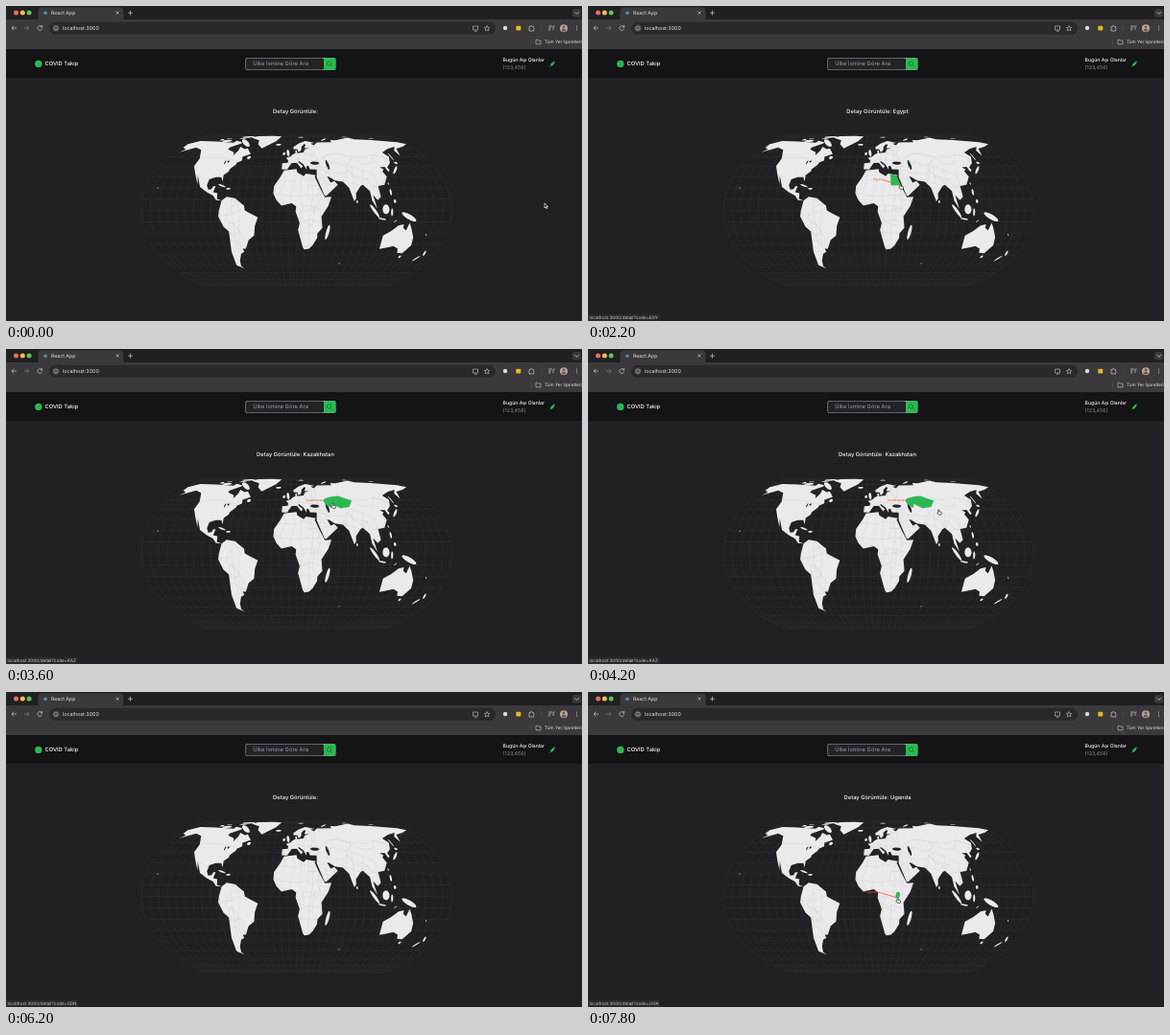
Recreate the animation shown at these times as an HTML page with a canvas. Size 600 px wide and 329 px high, loop 8000 ms.

```html
<!DOCTYPE html>
<html lang="tr">
<head>
<meta charset="utf-8">
<title>React App</title>
<style>
html, body { margin: 0; width: 100%; height: 100%; overflow: hidden; background: #212024; }
canvas { display: block; width: 600px; height: 329px; }
</style>
</head>
<body>
<canvas id="stage"></canvas>
<script>
const W = 600, H = 329, LOOP = 8000, STEP = 200;
const BODY = '#212024', BAR = '#3b393c', LAND = '#eaeaec', GREEN = '#2cb851', RED = '#ff5533';
const canvas = document.getElementById('stage');
const dpr = window.devicePixelRatio || 1;
canvas.width = W * dpr;
canvas.height = H * dpr;
const g = canvas.getContext('2d');

// Equal Earth projection, turned so that 10°E lies in the middle
function project(lon, lat) {
  const A = 1.340264, B = -0.081106, C = 0.000893, D = 0.003796, rad = Math.PI / 180;
  const t = Math.asin(Math.sqrt(3) / 2 * Math.sin(lat * rad)), t2 = t * t, t6 = t2 ** 3;
  const x = 2 * Math.sqrt(3) * (lon - 10) * rad * Math.cos(t) /
    (3 * (A + 3 * B * t2 + t6 * (7 * C + 9 * D * t2)));
  const y = t * (A + B * t2 + t6 * (C + D * t2));
  return [302.6 + 59.7 * x, 213.6 - 59.7 * y];
}

function numbers(s) {
  return s.trim().split(/\s+/).map(Number);
}
function outline(data) {
  const path = new Path2D(), n = numbers(data);
  for (let i = 0; i < n.length; i += 2) path.lineTo(...project(n[i], n[i + 1]));
  path.closePath();
  return path;
}
// Ellipse in degrees: centre, radii, tilt
function blob(data) {
  const [lon, lat, rx, ry, tilt = 0] = numbers(data), path = new Path2D();
  const c = Math.cos(tilt * Math.PI / 180), s = Math.sin(tilt * Math.PI / 180);
  for (let a = 0; a < 6.28; a += 0.5) {
    const u = rx * Math.cos(a), v = ry * Math.sin(a);
    path.lineTo(...project(lon + u * c - v * s, lat + u * s + v * c));
  }
  path.closePath();
  return path;
}

// Key points of the coasts, longitude and latitude
const continents = {
  northAmerica: '-168 66 -156 71 -128 70 -95 68 -94 71.5 -82 69 -81 67 -94 61 -94 58.7 -82 55 -80 51.5 -77 57 -78 62 -69 59 -65 60 -56 53 -66 50 -64 46 -70 43.5 -70 41.7 -76 37 -76 35 -81 31.5 -80 25.5 -83 29.5 -90 29.5 -97 27.5 -97.7 22 -95 18.2 -91 18.7 -90 21 -87 21.5 -88.5 16 -83.3 15 -83 10 -77.4 8.5 -84 9 -88 13 -96 16 -105.5 20.5 -113 31 -109.5 23 -117 32.5 -124 40 -124 48 -134 58 -146 61 -162 55 -158 58.5 -166 61',
  southAmerica: '-77.4 8.5 -72 12 -62 10.7 -51 4.2 -50 0 -44 -2.5 -35 -6 -39 -13.5 -41 -22 -48.5 -26 -54 -34 -58 -34 -57 -37 -62 -39 -67 -46 -69 -52 -66 -55 -75 -51 -73.5 -37 -70.4 -18.3 -76 -14 -81 -5 -80 0',
  greenland: '-73 78.3 -62 82 -35 83.5 -18 81 -25 70.3 -43.5 60 -53 66 -55 72 -68 76',
  africa: '-6 35.8 10 37.3 11 34 19 30.5 22 32.9 34 31.3 32.5 29.9 37.2 21 43.3 11.5 51 12 47 4 39 -5 40.5 -15 35 -20 35 -24 30 -31 25.7 -34 20 -34.8 18 -33 11.8 -17 13.7 -11 9 -1 9.6 3.5 4.5 6.2 -3 5 -7.5 4.3 -13.5 9 -17.3 14.8 -17 21.5 -9.7 30',
  europe: '-9 43 -1.7 43.4 -1.2 46 -4.7 48.5 1.5 50.2 4.5 52.5 8.5 54 8.2 57 10.5 57.5 11 54 20 54.7 23 59 30 60 22 60.5 25 65 22 65.8 17 61 18 60 16 56.5 13 55.5 11 59 6 58.5 5 61.5 13 66.5 25 71 40 67.5 33 66.5 38 64 50 62 50 42 36 36.7 27.3 37 26 40 23 40.3 23 36.5 19.5 41.5 13 45.5 12.5 44 18.5 40.2 16 38 10.5 43.5 3.5 43.3 -.3 39 -2 36.8 -9 37',
  asia: '38 64 44 68.4 69 69 69 72.5 78 72 104 77.6 113 74 140 72.5 180 69 190 66 178 62.5 163 59.5 157 51 156 57 164 62 150 59.4 135.5 54.7 140 50 135 43.3 128 39 129 36 126.5 34.5 125 39.5 118 39 122 37 119.3 35 122 30 116 22.5 108 21.5 109 12 105 9 100 13.3 104 1.4 98.3 8.5 97 17 90 22.5 87 21.5 80.2 15 79.8 10.5 77.5 8 72.8 20 66.5 25.3 57 26.5 50 30 48 30 51.5 24.5 56.2 26 59.8 22.5 45 12.8 43 13 35 29.5 36 36.7',
  australia: '114 -22 115 -34.3 124 -33 131 -31.5 138 -34 140 -38 147 -38.5 153 -31 151 -23.5 145.5 -15 142.5 -10.8 140 -17.5 136 -15 136 -12 130 -13 122.2 -18'
};
const islands = [
  // Arctic and Atlantic
  '-75 68 12 2.6 -28', '-110 71 8 2', '-121 73 3.5 1.5', '-80 80 11 2.3 6', '-86 75.3 7 .7', '-111 75.6 5 .6',
  '58 73.5 6 1 20', '18 78.7 5 1', '99 79.3 4 .8', '144 75 5 .5', '-19 65 4.5 1.3', '-8 53.3 1.9 1.7',
  '-2.3 54.3 2 4.2 18', '-56.3 49 2.5 1.8', '-79.5 21.7 5 .7 -15', '-71.3 19 2.7 .8',
  // Indian Ocean and Pacific
  '47 -19 1.9 6.8 -15', '80.8 7.6 .9 1.4', '101 -.4 8 1.5 -45', '110 -7.3 4.8 .7 -7', '114 1 4 4.2', '121 -1.5 1.2 3.4',
  '141 -5.5 9.5 2.2 -22', '125.5 -9.2 2 .4 25', '121.5 16 1.2 2.8', '124.8 8 1.5 1.6', '121 23.7 .6 1.2',
  '136.5 36.3 6 1.1 38', '143 43.4 2 1.2', '142.8 50 .8 4', '146.7 -42 1.6 1.3', '176 -38.5 1.3 2.7 25',
  '170.5 -43.8 3.8 1.1 42', '165.5 -21.3 1.6 .3 -40', '-155.5 19.6 .6 .5', '69.5 -49 .8 .4'
];
const seas = ['34.5 43.2 6 1.6', '51 41.5 1.8 5 12', '-86 44 .8 2', '-82 44.8 1.3 1'].map(blob);

const land = new Path2D();
for (const c of Object.values(continents)) land.addPath(outline(c));
for (const i of islands) land.addPath(blob(i));

// code, end of the pointer line, rough outline (cut off at the coast)
const countries = {
  Brazil: ['BRA', 248, 229, '-30 -3 -30 -30 -53 -34 -57 -30 -54 -25 -58 -18 -65 -11 -73 -8 -69 1 -60 5 -51 5'],
  Bolivia: ['BOL', 235, 240.5, '-69.5 -11 -65.4 -9.8 -60.5 -13.8 -57.7 -19.8 -62 -19.6 -63 -22.2 -67.8 -22.8'],
  Egypt: ['EGY', 325.5, 187, '25 32 34.5 31.6 33 29 37 22 25 22'],
  Sudan: ['SDN', 322, 200, '25 22 37 22 36 14 28 9.5 22 13'],
  'Democratic Republic of the Congo': ['COD', 314, 219, '12 -6 18 4.5 31 3.5 29 -8 29 -13 22 -11 17 -7'],
  Uganda: ['UGA', 321, 214.5, '30.9 3.6 34 4.2 35 1.8 34 -1 29.6 -1.2'],
  Russia: ['RUS', 360, 152, '28 69 40 80 190 80 190 55 144 45 131 43 135 48 120 53 108 49.5 80 51 61 54 47 49 40 43 38 48 28 57'],
  Kazakhstan: ['KAZ', 350, 164, '47 49 51 51.5 61 53.5 71 54.2 80 51 87 49 80 42.3 68 41 58 45.5 56 41.5 52 43 49 46'],
  China: ['CHN', 376, 174, '88 49 96.5 42.7 112 43.5 120 53 135 48 124 40 123 30 110 19 98 23 97 28 80 31 74 39.5'],
  India: ['IND', 357.5, 171.5, '74 37 79 32 81 29 88 26.5 97 28 92 22 91 25 89 26 88.5 21.5 82 16.5 80 10 77.5 8 73 19 69 22 70 27.5 74 32']
};
for (const c of Object.values(countries)) c[3] = outline(c[3]);

// Seeded wobbling borders: west, east, south, north, spacing
let seed = 7;
const random = () => (seed = seed * 16807 % 2147483647) / 2147483647;
const borders = new Path2D();
for (const [w, e, s, n, gap] of [[-18, 50, -30, 36, 11], [-10, 40, 37, 62, 8], [40, 110, 10, 44, 13], [-80, -50, -40, 8, 12]]) {
  const nodes = [];
  for (let lon = w; lon <= e; lon += gap) {
    const column = [];
    for (let lat = s; lat <= n; lat += gap)
      column.push(project(lon + (random() - 0.5) * gap * 0.8, lat + (random() - 0.5) * gap * 0.8));
    nodes.push(column);
  }
  nodes.forEach((column, i) => column.forEach((p, j) => {
    for (const q of [column[j + 1], nodes[i + 1]?.[j]]) {
      if (!q) continue;
      borders.moveTo(...p);
      borders.lineTo(...q);
    }
  }));
}
borders.moveTo(...project(-123, 49));
borders.lineTo(...project(-95, 49));
borders.lineTo(...project(-70, 45));
borders.moveTo(...project(-117, 32.5));
borders.lineTo(...project(-97, 26));

// Graticule every ten degrees
const grid = new Path2D();
for (let lon = -170; lon <= 190; lon += 10)
  for (let lat = -90; lat <= 90; lat += 5) grid[lat > -90 ? 'lineTo' : 'moveTo'](...project(lon, lat));
for (let lat = -90; lat <= 90; lat += 10) {
  grid.moveTo(...project(-170, lat));
  grid.lineTo(...project(190, lat));
}

// time, pointer x and y, hovered country, country in the status line
const scenes = [
  [0, 561, 206], [1200, 250, 231, 'Brazil'], [1400, 235.5, 236.5, 'Bolivia'], [1800, 252, 220, 'Brazil'],
  [2000, 290, 200], [2200, 324, 186, 'Egypt'], [2600, 360, 149, 'Russia'], [3000, 342, 161, 'Kazakhstan'],
  [3400, 342, 161, 'Kazakhstan'], [3600, 339, 161, 'Kazakhstan'], [4400, 372, 170, 'China'],
  [5000, 359.5, 187.5, 'India'], [5600, 345, 185, '', 'India'], [6000, 325, 196, 'Sudan'],
  [6200, 0, -30, '', 'Sudan'], [6400, 324, 198, 'Sudan'],
  [7200, 314, 214, 'Democratic Republic of the Congo'], [7800, 321, 215, 'Uganda']
];

function rect(x, y, w, h, color, r = 0) {
  g.fillStyle = color;
  g.beginPath();
  g.roundRect(x, y, w, h, r);
  g.fill();
}
function dot(x, y, r, color) {
  g.fillStyle = color;
  g.beginPath();
  g.arc(x, y, r, 0, 7);
  g.fill();
}
function text(s, x, y, size, color, weight = 400, align = 'left') {
  g.font = `${weight} ${size}px Inter, Roboto, sans-serif`;
  g.textRendering = 'geometricPrecision';
  g.fillStyle = color;
  g.textAlign = align;
  g.textBaseline = 'middle';
  g.fillText(s, x, y);
}
function line(d, color, width = 0.7) {
  g.strokeStyle = color;
  g.lineWidth = width;
  g.stroke(new Path2D(d));
}

function browser() {
  const icon = '#c9c9cc';
  rect(0, 0, W, 15, '#1f2022');
  rect(33.5, 1.5, 89, 16, BAR, 4);
  rect(0, 14, W, 31, BAR);
  ['#ee6a5f', '#f5bd4f', '#61c454'].forEach((c, i) => dot(10.5 + 6.8 * i, 7, 2.5, c));
  dot(41, 7.2, 1.8, '#4f8fa8');
  text('React App', 47, 7.4, 5.2, '#e4e4e6');
  line('M114.6 5.6l3 3m0-3l-3 3M127 7.2h5m-2.5-2.5v5', icon);
  rect(590, 3, 9, 8.5, BAR, 2.5);
  line('M592.7 6.3l2 2 2-2', icon, 0.8);
  line('M11 23H6m2.2-2.3L6 23l2.2 2.3', icon);
  line('M19 23h5m-2.2-2.3L24 23l-2.2 2.3', '#777679');
  line('M37.3 21.7a2.4 2.4 0 1 0 .3 2M37.6 20v2h-2', icon);
  rect(45, 16.8, 465, 13, '#29282b', 6.5);
  dot(52, 23.2, 4, BAR);
  line('M54.2 23.2a2.2 2.2 0 1 1-4.4 0 2.2 2.2 0 0 1 4.4 0M52 22.9v1.5', icon, 0.6);
  text('localhost:3000', 59, 23.4, 5.35, '#e6e6e8');
  line('M486.5 21h5v4h-5zM488 26.3h2.5', icon, 0.6);
  line('M501 20.5l.8 1.8 2 .2-1.5 1.3.5 2-1.8-1-1.8 1 .5-2-1.5-1.3 2-.2z', icon, 0.6);
  dot(520, 23, 2.2, '#d9dadc');
  rect(531.3, 20.8, 5, 4.8, '#e5b91f', 0.8);
  line('M545 21.5h1.3a1 1 0 0 1 2 0h1.3v1.5a1 1 0 0 1 0 1.7v1.3H545z', icon);
  line('M557.5 19.5v7M546.5 34.5v6', '#58575b', 0.5);
  line('M565 21h4m-4 2h3m-3 2h2M570 25v-4h1.5', icon);
  dot(581, 23.2, 4, '#b9a79c');
  dot(581, 22, 1.4, '#69564e');
  rect(578.9, 24, 4.2, 2.5, '#69564e', 1.2);
  for (const y of [21, 23, 25]) dot(594.5, y, 0.55, icon);
  line('M552 35.3h1.8l.7.8h2.5v3.7h-5z', icon, 0.6);
  text('Tüm Yer İşaretleri', 561, 37.7, 4.7, '#dededf');
}

function header() {
  rect(0, 45, W, 30, '#141416');
  dot(33.8, 60.4, 3.7, GREEN);
  text('COVID Takip', 40.4, 60.7, 5.8, '#f4f4f5', 500);
  rect(249.5, 54, 94, 13, '#a2a2a6', 2);
  rect(250.1, 54.6, 81, 11.8, '#232227', 1.5);
  rect(331, 54.3, 12.3, 12.4, GREEN, 1.5);
  text('Ülke İsmine Göre Ara', 257.3, 60.7, 5.8, '#9ca3af');
  line('M338.7 60a2.2 2.2 0 1 1-4.4 0 2.2 2.2 0 0 1 4.4 0M338 61.6l1.8 1.9', '#176b34', 0.7);
  text('Bugün Aşı Olanlar', 517.6, 56.7, 5.1, '#f4f4f5', 500);
  text('(123,456)', 517.6, 64.2, 5.3, '#8d8d94');
  line('M566 63.7l1.6-1.6M570.6 57.2l1.5 1.5M571.4 58l-1 1', GREEN, 0.7);
  line('M567.6 62.1l3.2-3.2', GREEN, 2.2);
}

function map(name) {
  g.strokeStyle = '#302f34';
  g.lineWidth = 0.5;
  g.stroke(grid);
  g.fillStyle = LAND;
  g.fill(land);
  g.fillStyle = BODY;
  for (const s of seas) g.fill(s);
  g.save();
  g.clip(land);
  g.strokeStyle = '#c8c8cd';
  g.lineWidth = 0.3;
  g.stroke(borders);
  for (const c of Object.values(countries)) g.stroke(c[3]);
  g.restore();
  if (!name) return;
  const [, x, y, shape] = countries[name];
  line(`M${x} ${y}l-19-5.5`, RED, 0.8);
  text(name, x - 19.5, y - 5.7, 3.3, RED, 400, 'right');
  g.save();
  g.clip(land);
  g.fillStyle = GREEN;
  g.fill(shape);
  g.restore();
}

function pointer(x, y, hand) {
  const p = new Path2D(hand
    ? 'M1.2 3.5V.6a.6.6 0 0 1 1.2 0V2.4l2 .4q.7.2.6 1L4.6 6H1.7L0 3.8q.3-.8 1.2-.3z'
    : 'M0 0v5.4l1.3-1.2.9 2 .9-.4-.9-1.9h1.7z');
  g.save();
  g.translate(x, y);
  g.scale(0.9, 0.9);
  g.fillStyle = hand ? '#fff' : '#111';
  g.strokeStyle = hand ? '#222' : '#eee';
  g.lineWidth = 0.8;
  g.fill(p);
  g.stroke(p);
  g.restore();
}

function draw(t) {
  const i = scenes.findLastIndex(s => s[0] <= t);
  const now = scenes[i], next = scenes[i + 1] || now;
  const k = next === now ? 0 : (t - now[0]) / (next[0] - now[0]);
  const [, x, y, name, lingering] = now;
  const link = name || lingering;
  g.setTransform(dpr, 0, 0, dpr, 0, 0);
  rect(0, 0, W, H, BODY);
  browser();
  header();
  text('Detay Görüntüle:' + (name ? ' ' + name : ''), 301.5, 110.6, 5.8, '#f4f4f5', 500, 'center');
  map(name);
  if (link) {
    rect(-3, 321.5, 78, 11, '#29282b', 2);
    text('localhost:3000/detail?code=' + countries[link][0], 1.5, 325.7, 4.6, '#d0d0d3');
  }
  pointer(x + (next[1] - x) * k, y + (next[2] - y) * k, !!name);
}

let shown = -1;
function tick() {
  const t = Math.floor(performance.now() % LOOP / STEP) * STEP;
  if (t !== shown) draw(shown = t);
  requestAnimationFrame(tick);
}
tick();
</script>
</body>
</html>
```
